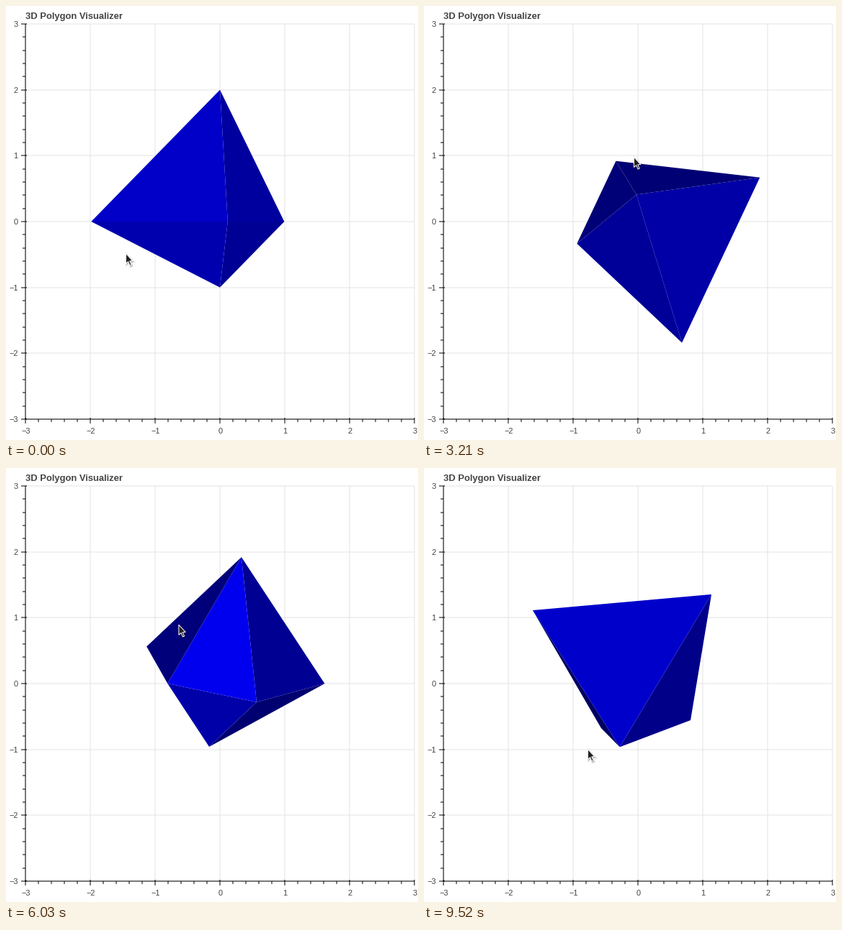
Recreate the animation shown at these times as a matplotlib script. Size 572 by 604 pixels, loop 9.56 s.

```python
import itertools
import math

import matplotlib.pyplot as plt
import numpy as np
from matplotlib.animation import FuncAnimation
from matplotlib.collections import LineCollection, PolyCollection
from matplotlib.patches import Polygon

W, H, DPI = 572, 604, 100
LOOP, STEP = 9560, 40
PX = 72 / DPI                      # points per pixel
CX, CY, SX, SY = 297, 300, 90, 550 / 6
LEFT, RIGHT, TOP, BOTTOM = CX - 3 * SX, CX + 3 * SX, CY - 3 * SY, CY + 3 * SY

# Ends of the drags: ms, spin, pitch, yaw in degrees, cursor x, y
DRAGS = [
    (0, 6.9, 0, 0, 166, 344),
    (1300, 188.8, 0, 0, 462, 344),
    (2300, 188.8, 158.8, 0, 311, 128),
    (3210, 148.5, 156.9, -120.2, 291, 210),
    (4850, 108.3, 129.9, -153.9, 300, 270),
    (5270, 81.2, 73.5, -22.4, 171, 222),
    (6850, 122.7, 100.8, -74.4, 284, 215),
    (8090, 74.7, 132.8, -137, 409, 342),
    (9520, 140.6, 118.8, -189.2, 227, 391),
]


def yaw(deg):
    """Turn the front to the right."""
    c, s = math.cos(math.radians(deg)), math.sin(math.radians(deg))
    return np.array([[c, 0, s], [0, 1, 0], [-s, 0, c]])


def pitch(deg):
    """Turn the front upwards."""
    c, s = math.cos(math.radians(deg)), math.sin(math.radians(deg))
    return np.array([[1, 0, 0], [0, c, s], [0, -s, c]])


def state(t):
    """Angles and cursor at time t, each drag slowing towards its end."""
    for a, b in zip(DRAGS, DRAGS[1:]):
        if t <= b[0]:
            f = 1 - (1 - (t - a[0]) / (b[0] - a[0])) ** 1.5
            return np.array(a[1:]) * (1 - f) + np.array(b[1:]) * f
    return np.array(DRAGS[-1][1:])


def solid(m):
    """Visible faces in pixels with their colours."""
    verts, colors = [], []
    # Each axis has one end at distance 1 and one at distance 2.
    for ends in itertools.product((1, -2), (2, -1), (1, -2)):
        n = m @ (1 / np.array(ends))
        nz = n[2] / np.linalg.norm(n)
        if nz <= 0:
            continue
        p = m * ends
        verts.append(np.column_stack([CX + SX * p[0], CY - SY * p[1]]))
        facing = 1 - math.acos(min(nz, 1)) / (math.pi / 2)
        colors.append((0, 0, (95 + 160 * facing) / 255))
    return verts, colors


fig = plt.figure(figsize=(W / DPI, H / DPI), dpi=DPI, facecolor="white")
ax = fig.add_axes([0, 0, 1, 1])
ax.set_xlim(0, W)
ax.set_ylim(H, 0)
ax.axis("off")


def add_lines(segments, color, z):
    ax.add_collection(LineCollection(segments, colors=color, linewidths=PX,
                                     snap=False, zorder=z), autolim=False)


grid = []
ticks = [[(LEFT, TOP), (LEFT, BOTTOM)], [(LEFT, BOTTOM), (RIGHT, BOTTOM)]]
font = dict(family="Liberation Sans", color="#444444", va="baseline")

for i in range(31):
    v = -3 + i / 5
    x, y = round(CX + SX * v), round(CY - SY * v)
    major = i % 5 == 0
    out, inner = (6, 2) if major else (4, 0)
    ticks.append([(x, BOTTOM - inner), (x, BOTTOM + out)])
    ticks.append([(LEFT - out, y), (LEFT + inner, y)])
    if major:
        grid.append([(x, TOP), (x, BOTTOM)])
        grid.append([(LEFT, y), (RIGHT, y)])
        label = f"{v:.0f}".replace("-", "\u2212")
        ax.text(x + 0.3, 595, label, ha="center", size=11 * PX, **font)
        ax.text(16.5, y + 4, label, ha="right", size=11 * PX, **font)

ax.text(27, 18, "3D Polygon Visualizer", weight="bold", size=13 * PX, **font)
add_lines(grid, "#e5e5e5", 1)
add_lines(ticks, "black", 3)
faces = PolyCollection([], edgecolors="none", linewidths=0, zorder=2)
ax.add_collection(faces, autolim=False)

ARROW = np.array([(0.5, 0.5), (0.5, 14.5), (3.6, 11.7), (6, 17.2),
                  (8.2, 16.2), (5.8, 10.9), (9.8, 10.6)])
shadows = [ax.add_patch(Polygon(ARROW, fc="black", ec="black", lw=w * PX,
                                alpha=0.1, zorder=4)) for w in (1, 3)]
arrow = ax.add_patch(Polygon(ARROW, fc="#222222", ec="white", lw=PX,
                             joinstyle="round", zorder=5))


def draw(i):
    spin, tilt, turn, *tip = state(i * STEP)
    verts, colors = solid(yaw(turn) @ pitch(tilt) @ yaw(spin))
    faces.set_verts(verts)
    faces.set_facecolor(colors)
    arrow.set_xy(ARROW + tip)
    for s in shadows:
        s.set_xy(ARROW + tip + [1, 1.5])
    return [faces, arrow, *shadows]


anim = FuncAnimation(fig, draw, frames=LOOP // STEP, interval=STEP,
                     repeat=True, repeat_delay=0)
plt.show()
```
